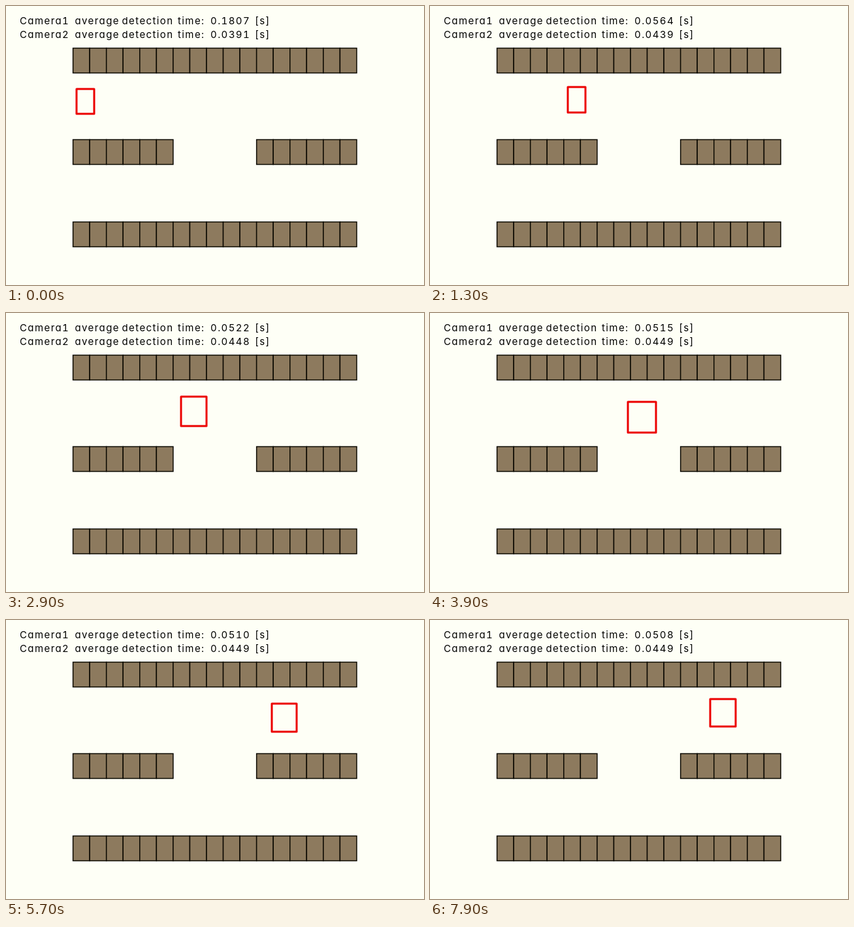
These frames come from a looping animation (640 px wide and 427 px high, 8 s). An HTML page:

```html
<!DOCTYPE html>
<html lang="en">
<head>
<meta charset="utf-8">
<style>
  html, body { margin: 0; width: 100%; height: 100%; overflow: hidden; background: #fefff6; }
  svg { display: block; width: 100vw; height: 100vh; }
  text {
    font: 400 15px Inter, "DejaVu Sans", sans-serif;
    font-feature-settings: "tnum", "cv11";
    letter-spacing: 1.4px;
    fill: #000;
  }
  .space { fill: #8d7a5e; stroke: #0a0800; stroke-width: 1.5; }
  #car { fill: none; stroke: #ec0000; stroke-width: 3; stroke-linejoin: round; }
</style>
</head>
<body>
<svg id="stage" viewBox="0 0 640 427"></svg>
<script>
const LOOP = 8000, STEP = 100, PITCH = 25.55;
const stage = document.getElementById('stage');

// Waypoints of the car: time, centre x, centre y, width, height
const path = [
  [0, 121.5, 146, 27, 38],
  [1300, 224.5, 143.5, 27, 39],
  [2100, 259, 144, 36, 44],
  [3900, 324, 159.5, 43, 47],
  [4500, 321, 166, 43, 47],
  [5000, 383.5, 157.5, 35, 43],
  [6400, 468, 140.5, 40, 43],
  [7900, 448.5, 142, 39, 42]
];

function add(name, attrs, content = '') {
  const el = document.createElementNS('http://www.w3.org/2000/svg', name);
  for (const key in attrs) el.setAttribute(key, attrs[key]);
  el.textContent = content;
  return stage.appendChild(el);
}

function along(path, t) {
  const i = Math.max(1, path.findIndex(k => k[0] >= t));
  const a = path[i - 1], b = path[i];
  const p = (t - a[0]) / (b[0] - a[0]);
  return a.slice(1).map((v, j) => v + (b[j + 1] - v) * p);
}

function addRow(y, first, count) {
  for (let i = first; i < first + count; i++)
    add('rect', { class: 'space', x: 102.6 + PITCH * i, y, width: PITCH, height: 38 });
}

function addLabel(camera, y) {
  const word = (x, s) => add('text', { x, y }, s);
  word(21, 'Camera' + camera);
  word(105.5, 'average');
  word(177.5, 'detection');
  word(263, 'time:');
  word(381, '[s]');
  return word(313, '');
}

addRow(64.5, 0, 17);
addRow(204.5, 0, 6);
addRow(204.5, 11, 6);
addRow(330.5, 0, 17);
const readings = [addLabel(1, 27.5), addLabel(2, 49)];
const car = add('rect', { id: 'car' });

// Running averages in units of 0.1 ms; camera 1 starts with one slow detection.
const averages = t => [
  497 - 40 * Math.exp(-t / 4200) + 1350 / (t / STEP + 1),
  449 - 58 * Math.exp(-t / 740)
];

function draw(now) {
  const t = Math.floor(now % LOOP / STEP) * STEP;

  const [x, y, width, height] = along(path, t);
  const box = { x: x - width / 2, y: y - height / 2, width, height };
  for (const key in box) car.setAttribute(key, Math.round(box[key]));

  averages(t).forEach((v, i) => readings[i].textContent = (v / 1e4).toFixed(4));
  requestAnimationFrame(draw);
}
draw(0);
</script>
</body>
</html>
```
